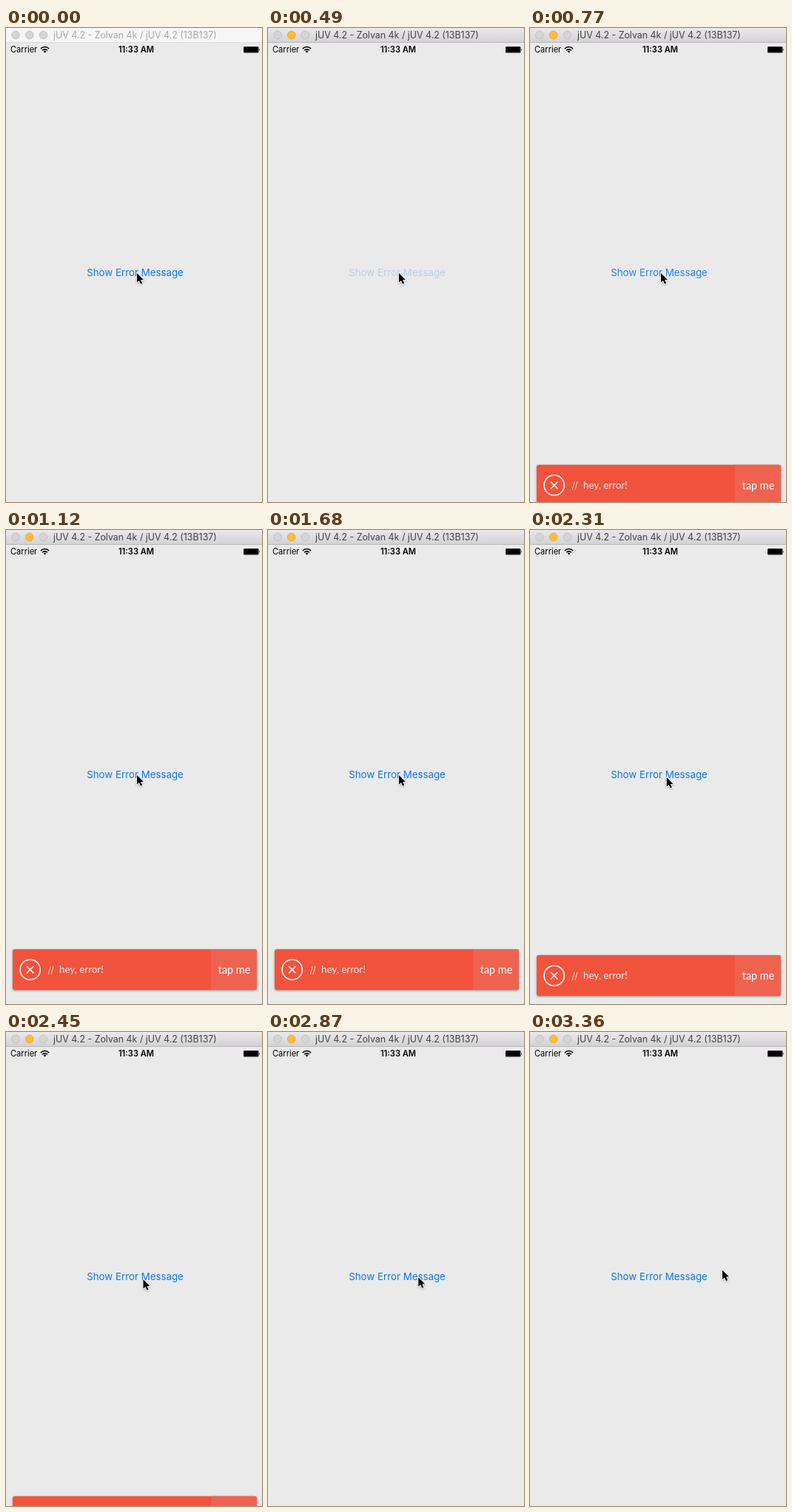
Write an HTML page that moves like this. It is 346 by 640 pixels and loops after 3430 ms.

```html
<!DOCTYPE html>
<html lang="en">
<head>
<meta charset="utf-8">
<title>Error message</title>
<style>
  html, body { margin: 0; width: 100%; height: 100%; overflow: hidden; background: #eaeaea; }
  svg { display: block; width: 346px; height: 640px; font-family: Inter, "Liberation Sans", sans-serif; }
  .toast { font-family: Lato, "Open Sans", sans-serif; fill: #fdebe8; }
</style>
</head>
<body>
<svg viewBox="0 0 346 640">
  <defs>
    <linearGradient id="activeBar" x2="0" y2="1">
      <stop stop-color="#eae8ea"/>
      <stop offset="1" stop-color="#d4d2d4"/>
    </linearGradient>
    <filter id="toastShadow" x="-5%" y="-20%" width="110%" height="140%">
      <feDropShadow dx="0" dy="1" stdDeviation="1.5" flood-opacity=".4"/>
    </filter>
    <filter id="cursorShadow" x="-50%" y="-50%" width="200%" height="200%">
      <feDropShadow dx="0" dy="1" stdDeviation="1" flood-opacity=".35"/>
    </filter>
  </defs>

  <rect width="346" height="640" fill="#eaeaea"/>

  <rect id="bar" width="346" height="19"/>
  <rect id="barLine" y="19" width="346" height="1"/>
  <g stroke-width="1">
    <circle cx="13" cy="9.5" r="5.3" fill="#d6d5d6" stroke="#c2c1c2"/>
    <circle id="minimize" cx="31.7" cy="9.5" r="5.3"/>
    <circle cx="50.4" cy="9.5" r="5.3" fill="#d6d5d6" stroke="#c2c1c2"/>
  </g>
  <text id="title" x="64" y="14" font-size="12.4">jUV 4.2 - Zolvan 4k / jUV 4.2 (13B137)</text>

  <text x="6" y="33" font-size="11.1">Carrier</text>
  <g fill="none" stroke="#000" stroke-width="1.6">
    <path d="M46.9 28a7.6 7.6 0 0 1 11.2 0M49 30.3a4.9 4.9 0 0 1 7 0"/>
    <path d="M52.5 33.6l-2-2a2.9 2.9 0 0 1 4 0z" fill="#000" stroke="none"/>
  </g>
  <text x="176" y="33" font-size="11.1" font-weight="600" text-anchor="middle">11:33 AM</text>
  <rect x="321" y="25" width="20.5" height="8.6" rx="1.6"/>
  <rect x="321.9" y="25.9" width="18.7" height="6.8" rx="1" fill="none" stroke="#777" stroke-width=".4"/>
  <path d="M342.3 27.7q1.6 1.6 0 3.2z"/>

  <text id="button" x="174.5" y="335" font-size="13.3" text-anchor="middle" fill="#0f78ea">Show Error Message</text>

  <g id="toast" class="toast">
    <rect x="9" y="566" width="330" height="55" rx="3" fill="#f1523d" filter="url(#toastShadow)"/>
    <path d="M277 566h59a3 3 0 0 1 3 3v49a3 3 0 0 1-3 3h-59z" fill="#ee6350"/>
    <g fill="none" stroke="#fff" stroke-width="1.5">
      <circle cx="32.7" cy="593.7" r="13.6"/>
      <path d="M28 589l9.4 9.4m0-9.4l-9.4 9.4"/>
    </g>
    <path d="M57.2 600l3-11m.7 11l3-11" fill="none" stroke="#fbd9d3"/>
    <text x="72" y="598" font-size="13.4">hey, error!</text>
    <text x="308.5" y="599" font-size="14.4" text-anchor="middle" fill="#fff">tap me</text>
  </g>

  <g id="cursor" filter="url(#cursorShadow)">
    <path d="M0 0V12.6L2.9 9.9L5 14.6L7.1 13.7L5.1 9.1H9Z" stroke="#fff" stroke-width="1.4" paint-order="stroke"/>
  </g>
</svg>
<script>
const LOOP = 3430, STEP = 70;
const ACTIVATE = 140, PRESS = 420, RELEASE = 560;
const SHOW = 590, HIDE = 2240, SLIDE = 300, TRAVEL = 74;
// time, x, y
const cursorPath = [
  [1750, 177, 331],
  [2030, 182, 333.5],
  [2450, 185.5, 334],
  [2660, 187, 334],
  [3290, 260, 321.5]
];

const el = id => document.getElementById(id);
const set = (id, attrs) => {
  for (const name in attrs) el(id).setAttribute(name, attrs[name]);
};
const progress = (t, start, duration) => Math.min(1, Math.max(0, (t - start) / duration));
const ease = p => p < .5 ? 2 * p * p : 1 - 2 * (1 - p) ** 2;

function cursorAt(t) {
  let [, x, y] = cursorPath[0];
  for (let i = 1; i < cursorPath.length; i++) {
    const [start, x0, y0] = cursorPath[i - 1];
    const [end, x1, y1] = cursorPath[i];
    const p = ease(progress(t, start, end - start));
    x += (x1 - x0) * p;
    y += (y1 - y0) * p;
  }
  return [x, y];
}

function draw(t) {
  const active = t >= ACTIVATE;
  set("bar", { fill: active ? "url(#activeBar)" : "#f6f6f6" });
  set("barLine", { fill: active ? "#b9b7b9" : "#dcdcdc" });
  set("minimize", {
    fill: active ? "#fdbd3c" : "#d6d5d6",
    stroke: active ? "#e9a835" : "#c2c1c2"
  });
  set("title", { fill: active ? "#434343" : "#a8a8a8" });

  const opacity = t < PRESS ? 1 : .23 + .77 * ease(progress(t, RELEASE, 280));
  set("button", { opacity });

  const shown = ease(progress(t, SHOW, SLIDE)) - ease(progress(t, HIDE, SLIDE));
  set("toast", {
    transform: `translate(0 ${TRAVEL * (1 - shown)})`,
    visibility: shown > 0 ? "visible" : "hidden"
  });
  set("cursor", { transform: `translate(${cursorAt(t)})` });
}

const origin = performance.now();
function tick() {
  const t = (performance.now() - origin) % LOOP;
  draw(Math.floor(t / STEP) * STEP);
  requestAnimationFrame(tick);
}
tick();
</script>
</body>
</html>
```
